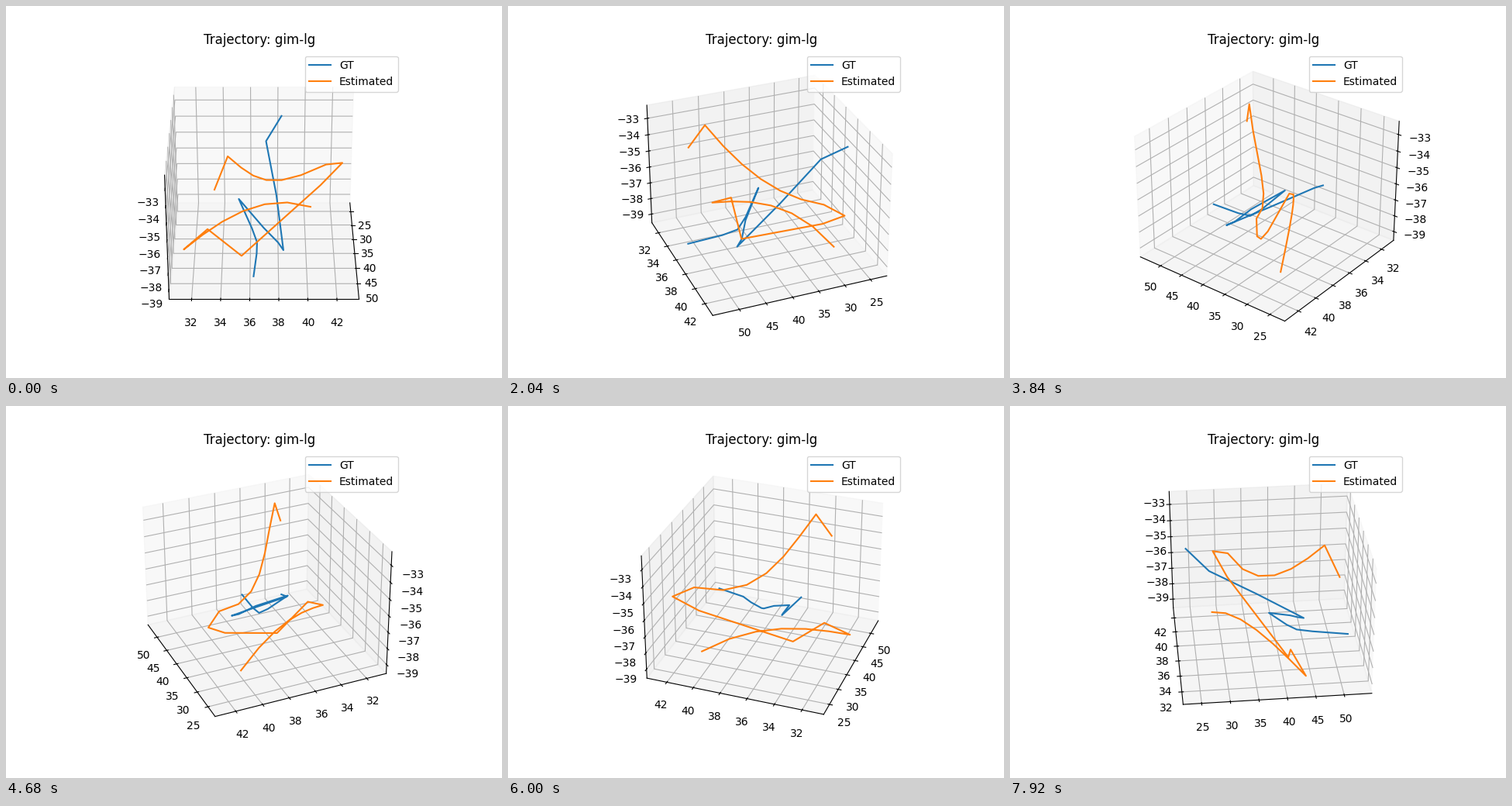
Write a matplotlib script that moves like this. It is 640 px wide and 480 px high and loops after 8 s.

```python
from math import comb

import numpy as np
import matplotlib.pyplot as plt
from matplotlib.animation import FuncAnimation

TICK_MS = 40        # animation tick
TICKS = 200         # 200 * 40 ms = 8 s
HOLD = 3            # ticks per camera step
STEP_DEG = 4        # camera turn per step

# Axis ranges shown by the panes, and the size of the drawn box
LIMITS = np.array([(21.78, 54.88), (30.453, 43.52), (-39.56, -32.21)])
BOX = np.array([1.1905, 1.1905, 0.8929])


def bezier(steps, *ctrl):
    """Points at even parameter steps along a Bezier curve."""
    n = len(ctrl) - 1
    t = np.linspace(0, 1, steps + 1)[:, None]
    return sum(comb(n, i) * t**i * (1 - t)**(n - i) * np.array(p)
               for i, p in enumerate(ctrl))


def to_data(*parts):
    """Join parts given in thousandths of a view unit from the box centre."""
    span = LIMITS[:, 1] - LIMITS[:, 0]
    return (LIMITS.mean(axis=1) + np.vstack(parts) / 1000 / BOX * span).T


gt = to_data(
    (-519, 116, 270), (-378, 13, 155), (-64, 80, -73),
    (251, 124, -301), (206, 91, -272), (143, -3, -198),
    bezier(4, (-12, -164, -74), (231, -6, -349),
           (88, -38, -273), (519, -66, -326)),
)
estimated = to_data(
    (417, -305, 243),
    bezier(6, (330, -223, 429), (149, -53, 155),
           (-68, 29, -56), (-227, 407, 62)),
    (-320, 519, 23), (-236, 374, -99),
    (117, -147, -429), (105, -366, -232),
    bezier(6, (185, -519, -337), (5, -289, -225),
           (-192, -12, -118), (-346, 314, -331)),
)

fig = plt.figure(figsize=(6.4, 4.8), dpi=100)
ax = fig.add_subplot(projection="3d")
ax.plot(*gt, label="GT")
ax.plot(*estimated, label="Estimated")

ax.set(xlim=LIMITS[0], ylim=LIMITS[1], zlim=LIMITS[2])
ax.set_xticks(range(25, 51, 5))
ax.set_yticks(range(32, 43, 2))
ax.set_zticks(range(-39, -32))
ax.set_title("Trajectory: gim-lg", x=0.4975)
ax.legend(loc="upper right")


def update(tick):
    ax.view_init(elev=30, azim=STEP_DEG * (tick // HOLD))
    return []


anim = FuncAnimation(fig, update, frames=TICKS, interval=TICK_MS, repeat=True)
plt.show()
```
